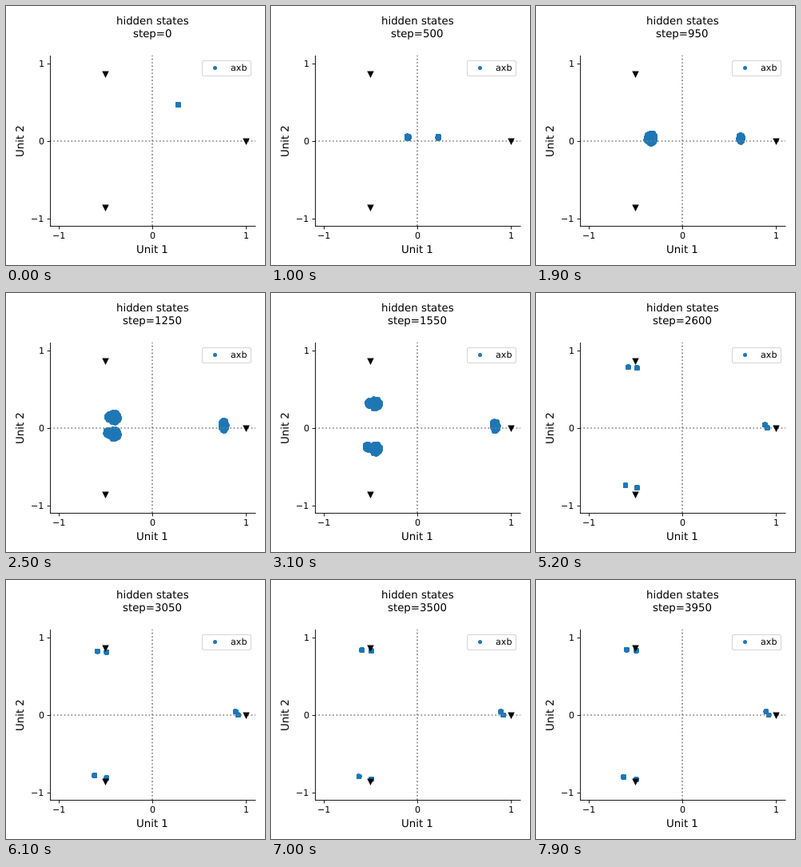
Recreate the animation shown at these times as an HTML page with a canvas. Size 324 px wide and 324 px high, loop 8 s.

```html
<!DOCTYPE html>
<html lang="en">
<head>
<meta charset="utf-8">
<title>hidden states</title>
<style>
  html, body { margin: 0; width: 100%; height: 100%; overflow: hidden; background: #fff; }
  canvas { display: block; }
</style>
</head>
<body>
<canvas id="stage" width="324" height="324"></canvas>
<script>
const ctx = document.getElementById('stage').getContext('2d');
const LOOP = 8000, FRAME = 100, BLUE = '#1f77b4';
const DOTS = 90, DOT_RADIUS = 2.5, GOLDEN_ANGLE = 2.4;
const START = { x: .275, y: .47 }, LIFT = .035;

// Each cluster ends at (x, y); a smaller satellite parts from it by (dx, dy).
const clusters = [
  { x: -.5, y: .84, dx: -.107, dy: .012, width: .95 },
  { x: -.5, y: -.84, dx: -.14, dy: .035, width: .95 },
  { x: .93, y: 0, dx: -.028, dy: .045, width: .6 },
];

const toX = x => 183.3 + 116.7 * x;
const toY = y => 169 - 96.8 * y;
const snap = n => Math.floor(n) + .5;

// Sigmoid growth from 0 to 1 that passes one half at the given time.
const rise = (t, half, power) => 1 / (1 + (half / Math.max(t, 1)) ** power);

function drawBlob(x, y, w, h) {
  ctx.fillStyle = BLUE;
  for (let i = 0; i < DOTS; i++) {
    const r = Math.sqrt((i + .5) / DOTS), a = i * GOLDEN_ANGLE;
    dot(snap(toX(x) + r * w * Math.cos(a)), snap(toY(y) + r * h * Math.sin(a)));
  }
}

// The points fall to the middle, split sideways, then split up and down.
function drawClusters(t) {
  const fall = Math.exp(-t / 300);
  const across = rise(t, 1500, 3), apart = rise(t, 3450, 6), gap = rise(t, 2700, 3);
  const spread = 1 + 7 * Math.exp(-(((t - 2700) / 1300) ** 2));
  for (const c of clusters) {
    const x = START.x * fall + c.x * across;
    const y = START.y * fall + c.y * apart + LIFT * (1 - fall) * (1 - apart);
    const w = Math.max(1, spread * c.width);
    drawBlob(x, y, w, spread);
    drawBlob(x + c.dx * gap, y + c.dy * gap, Math.max(1, w * .6), Math.max(1, spread * .6));
  }
}

function text(str, x, y, size, align = .5) {
  ctx.font = `${size}px "DejaVu Sans", sans-serif`;
  ctx.textRendering = 'geometricPrecision';
  ctx.fillStyle = '#000';
  ctx.fillText(str, Math.round(x - align * ctx.measureText(str).width), y);
}

function line(x1, y1, x2, y2) {
  ctx.beginPath();
  ctx.moveTo(x1, y1);
  ctx.lineTo(x2, y2);
  ctx.stroke();
}

function dot(x, y) {
  ctx.beginPath();
  ctx.arc(x, y, DOT_RADIUS, 0, 2 * Math.PI);
  ctx.fill();
}

function triangle(x, y) {
  const r = 10 / 3;
  ctx.beginPath();
  ctx.moveTo(x - r, y - r);
  ctx.lineTo(x + r, y - r);
  ctx.lineTo(x, y + r);
  ctx.closePath();
  ctx.fill();
  ctx.stroke();
}

function drawGuides() {
  const w = 5 / 3;
  ctx.strokeStyle = '#808080';
  ctx.lineWidth = w;
  ctx.setLineDash([w, w * 1.65]);
  line(55, 169, 312, 169);
  line(183, 275, 183, 62);
  ctx.setLineDash([]);
}

function drawAxes() {
  ctx.strokeStyle = '#000';
  ctx.lineWidth = .89;
  line(55.5, 62, 55.5, 275.9);
  line(55.1, 275.5, 312.5, 275.5);
  for (const n of [-1, 0, 1]) {
    const x = snap(toX(n) + .2), y = snap(toY(n) + .4);
    const label = String(n).replace('-', '−');
    line(x, 275.5, x, 279.4);
    line(55.5, y, 51.6, y);
    text(label, x, 291, 11.11);
    text(label, 47.6, Math.floor(y + 4), 11.11, 1);
  }
  text('Unit 1', 183, 309, 13.333);
  ctx.save();
  ctx.translate(22, 169);
  ctx.rotate(-Math.PI / 2);
  text('Unit 2', 0, 0, 13.333);
  ctx.restore();
}

function drawLegend() {
  ctx.fillStyle = '#fff';
  ctx.strokeStyle = '#d6d6d6';
  ctx.lineWidth = 1.11;
  ctx.beginPath();
  ctx.roundRect(245.5, 68.5, 61, 19, 2.2);
  ctx.fill();
  ctx.stroke();
  ctx.fillStyle = BLUE;
  dot(261.5, 77.5);
  text('axb', 281, 81, 11.11, 0);
}

function drawCorners() {
  ctx.fillStyle = ctx.strokeStyle = '#000';
  ctx.lineWidth = 1.11;
  for (const turn of [0, 1, 2]) {
    const a = turn * 2 * Math.PI / 3;
    triangle(snap(toX(Math.cos(a))), snap(toY(Math.sin(a))));
  }
}

function draw(now) {
  const frame = Math.floor(now % LOOP / FRAME);
  ctx.fillStyle = '#fff';
  ctx.fillRect(0, 0, 324, 324);
  drawClusters(frame * FRAME);
  drawGuides();
  drawAxes();
  drawCorners();
  drawLegend();
  text('hidden states', 183, 23, 13.333);
  text(`step=${frame * 50}`, 183, 39, 13.333);
}

const begin = performance.now();
function tick() {
  draw(performance.now() - begin);
  requestAnimationFrame(tick);
}
tick();
</script>
</body>
</html>
```
